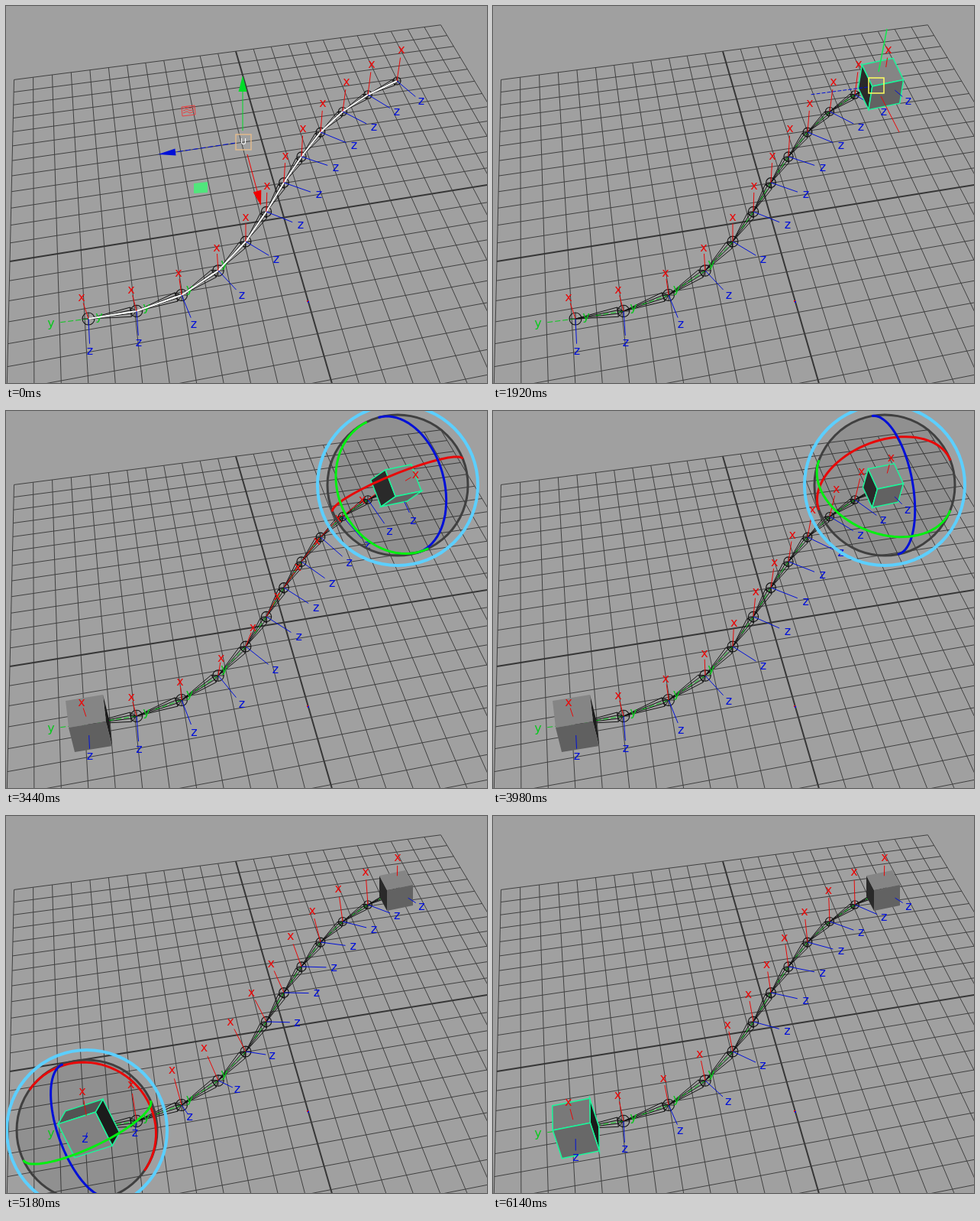
These frames come from a looping animation (630 by 493 pixels, 6.62 s). An HTML page with a canvas:

```html
<!DOCTYPE html>
<html lang="en">
<head>
<meta charset="utf-8">
<title>Twisting joint chain</title>
<style>
html, body { margin: 0; width: 100%; height: 100%; overflow: hidden; background: #a0a0a0; }
canvas { display: block; }
</style>
</head>
<body>
<canvas id="stage" width="630" height="493"></canvas>
<script>
const c = document.getElementById('stage').getContext('2d');
const LOOP = 6620, RAD = Math.PI / 180;
const RED = '#e80808', GREEN = '#08c81c', BLUE = '#0010d8', SELECT = '#1cf59a';

// Joint position, x label offset, z label offset
const joints = [
  [108, 409, -9, -27, 2, 43], [171, 399, -7, -27, 3, 42], [230, 378, -4, -28, 16, 39],
  [278, 346, -2, -29, 31, 33], [314, 308, 0, -31, 40, 24], [341, 269, 1, -33, 45, 18],
  [364, 231, 2, -34, 46, 16], [387, 197, 2, -36, 45, 15], [412, 165, 3, -37, 44, 18],
  [441, 138, 5, -38, 41, 21], [474, 116, 5, -39, 38, 23], [512, 98, 6, -40, 32, 27]
];

// Each ring: [angle, bulge] at rest and at the far turn
const cubes = {
  right: { at: [511, 97.5], side: 0, sideTone: '#2a2a2a', a: [34, -7], tilt: 0,
    d: [10, 19], e: [9, 30], h: [0, 27], f: [-26, -7], top: 133, topTurn: 0, front: 98, frontTurn: 0,
    hub: [513, 97], full: 47,
    rings: [[RED, -20, -.86, -22, -.16], [BLUE, -98, .27, -106, .66], [GREEN, 0, .61, 64, .85]] },
  left: { at: [108.5, 408.5], side: 1, sideTone: '#1b1b1b', a: [49, -8], tilt: .18,
    d: [4, 35], e: [19, 13.5], h: [8, 32], f: [-24, -30], top: 133, topTurn: 1.2, front: 96, frontTurn: -.8,
    hub: [106, 411], full: -42,
    rings: [[RED, 0, -.86, 35, -.95], [BLUE, -99, -.2, -110, -.41], [GREEN, -8, .55, -25, .25]] }
};

const mix = (a, b, p) => a + (b - a) * p;
const add = (...v) => v.reduce((s, p) => [s[0] + p[0], s[1] + p[1]]);
const mul = (v, k) => [v[0] * k, v[1] * k];
const cross = (a, b) => a[0] * b[1] - a[1] * b[0];

// Eased value through [time, value] pairs
function key(t, ...keys) {
  if (t <= keys[0][0]) return keys[0][1];
  for (let i = 1; i < keys.length; i++) {
    const [t0, v0] = keys[i - 1], [t1, v1] = keys[i];
    if (t < t1) {
      const p = (t - t0) / (t1 - t0);
      return mix(v0, v1, p * p * (3 - 2 * p));
    }
  }
  return keys[keys.length - 1][1];
}

function path(points, color, width = 1, closed = false) {
  c.beginPath();
  points.forEach(p => c.lineTo(p[0], p[1]));
  if (closed) c.closePath();
  c.strokeStyle = color;
  c.lineWidth = width;
  c.stroke();
}

function fill(points, color) {
  c.beginPath();
  points.forEach(p => c.lineTo(p[0], p[1]));
  c.fillStyle = color;
  c.fill();
}

function circle(x, y, r, color, width) {
  c.beginPath();
  c.arc(x, y, r, 0, 7);
  c.strokeStyle = color;
  c.lineWidth = width;
  c.stroke();
}

function label(text, x, y, color, size = 16) {
  c.font = size + 'px "DejaVu Sans", sans-serif';
  c.textAlign = 'center';
  c.fillStyle = color;
  c.fillText(text, x, y + size * .28);
}

function ground(u, v) {
  const w = 1 + .0485 * u - .235 * v;
  return [(359.2 * u - 7.7 * v + 364) / w, (-41.3 * u + 203.4 * v + 276.5) / w];
}

function grid() {
  for (let i = -12; i <= 12; i++) {
    const k = i / 12, width = i ? 1 : 2, color = i ? '#404040' : '#363636';
    path([ground(k, -1), ground(k, 1)], color, width);
    path([ground(-1, k), ground(1, k)], color, width);
  }
  fill([[394, 385], [396, 385], [396, 387], [394, 387]], RED);
  fill([[395, 386], [397, 386], [397, 388], [395, 388]], BLUE);
}

function pose(shift, twistL, twistR) {
  return joints.map(([x, y, xx, xy, zx, zy], i) => {
    const bump = Math.sin(Math.PI * (i / 11) ** 1.2) ** 2;
    const turn = mix(twistL, twistR, i / 11) * RAD, co = Math.cos(turn), si = Math.sin(turn);
    return {
      p: [x + .19 * shift[0] * bump, y + .06 * shift[1] * bump],
      x: [xx * co + zx * si, xy * co + zy * si],
      z: [zx * co - xx * si, zy * co - xy * si],
      r: 8 - i * .27
    };
  });
}

function bone(parent, child, r) {
  const dx = child[0] - parent[0], dy = child[1] - parent[1], len = Math.hypot(dx, dy);
  const dir = [dx / len, dy / len], norm = [-dir[1], dir[0]], wide = add(parent, mul(dir, r));
  const corners = [-.8, -.25, .3, .8].map(k => add(wide, mul(norm, k * r)));
  corners.forEach(q => path([parent, q, child], '#111'));
  path([corners[0], corners[3]], '#111');
}

function axis(j, v, color, name, from) {
  path([add(j.p, mul(v, from)), add(j.p, mul(v, .76))], color);
  label(name, ...add(j.p, v), color);
}

function axes(j, from = 0) {
  axis(j, j.x, RED, 'x', from);
  axis(j, j.z, BLUE, 'z', from);
}

function chain(chainPose, curve) {
  chainPose.forEach((j, i) => {
    const prev = i ? chainPose[i - 1].p : [45, 417];
    const y = add(mul(j.p, .22), mul(prev, .78));
    if (i) bone(j.p, prev, j.r);
    c.setLineDash([7, 3]);
    path([j.p, add(mul(j.p, .2), mul(y, .8))], GREEN);
    c.setLineDash([]);
    if (i < 5) label('y', ...y, GREEN);
    circle(...j.p, j.r, '#111', 1.1);
    path([add(j.p, [-j.r, 0]), add(j.p, [j.r, 0])], '#111', .8);
    path([add(j.p, [0, -j.r]), add(j.p, [0, j.r])], '#111', .8);
  });
  if (curve) path(chainPose.map(j => j.p), '#fff', 2);
}

function cube(q, turn, selected, at = q.at, size = 1) {
  const co = Math.cos(turn * RAD), si = Math.sin(turn * RAD);
  const A = mul([q.a[0], q.a[1] + q.tilt * turn], size);
  const D = mul(add(mul(q.d, co), mul(q.e, si)), size);
  const H = mul(add(mul(q.h, co), mul(q.f, si)), size);
  const o = add(at, mul(add(A, D, H), -.5));
  const face = (start, u, v, color) => {
    const pts = [start, add(start, u), add(start, u, v), add(start, v)];
    fill(pts, color);
    if (selected) path(pts, SELECT, 1.5, true);
  };
  const gray = v => `rgb(${v},${v},${v})`;
  face(q.side ? add(o, A) : o, D, H, q.sideTone);
  if (cross(A, D) > 0) face(o, A, D, gray(q.top + q.topTurn * turn));
  if (cross(A, H) > 0) face(add(o, D), A, H, gray(q.front + q.frontTurn * turn));
}

function mover(at, active) {
  c.save();
  c.translate(...at);
  const arm = (from, base, tip, half, color, dash) => {
    c.setLineDash(dash);
    path([from, base], color);
    c.setLineDash([]);
    const dx = tip[0] - base[0], dy = tip[1] - base[1], len = Math.hypot(dx, dy);
    const n = [-dy / len * half, dx / len * half];
    fill([tip, add(base, n), add(base, mul(n, -1))], color);
  };
  arm([-1, -15], [-1, -66], [-1, -87], 5.5, '#00dc28', []);
  arm([-10, 1], [-89, 13], [-112, 16], 4.5, BLUE, [7, 3]);
  arm([5, 16], [18, 64], [23, 83], 5.5, '#f00000', []);
  c.save();
  c.translate(-72, -41);
  path([[-9, -5], [8, -7], [9, 5], [-8, 7]], '#e84040', 1, true);
  for (let k = -4; k <= 4; k += 3) path([[-7, k + 1], [-2, k - 1], [2, k + 1], [7, k - 1]], '#e84040');
  c.restore();
  fill([[-65, 54], [-47, 52], [-47, 66], [-65, 67]], '#50e67c');
  path([[-10, -10], [10, -10], [10, 10], [-10, 10]], active ? '#ffff60' : '#dfb98c', 1.5, true);
  label('U', 0, 0, active ? '#ffff90' : '#fff', active ? 8 : 11);
  c.restore();
}

function dragger(at) {
  const to = (x, y) => add(at, [x, y]);
  path([to(3, -18), to(14, -74)], '#10e850', 1.5);
  path([to(6, 14), to(30, 61)], RED);
  c.setLineDash([5, 2]);
  path([to(-11, 2), to(-87, 12)], BLUE);
  c.setLineDash([]);
  path([to(-10, -10), to(10, -10), to(10, 10), to(-10, 10)], '#ffff60', 1.5, true);
}

function shade(q) {
  c.beginPath();
  c.arc(...q.hub, 92, 0, 7);
  c.fillStyle = 'rgba(0,0,0,.1)';
  c.fill();
}

function rings(q, turn) {
  const p = turn / q.full;
  circle(...q.hub, 92, '#404040', 3);
  circle(...q.hub, 105, '#5ccfff', 4);
  for (const [color, a0, b0, a1, b1] of q.rings) {
    const a = mix(a0, a1, p) * RAD, b = Math.max(-1, Math.min(1, mix(b0, b1, p)));
    const pts = [];
    for (let s = 0; s <= 40; s++) {
      const k = s / 40 * Math.PI, u = 92 * Math.cos(k), v = 92 * b * Math.sin(k);
      pts.push(add(q.hub, [u * Math.cos(a) - v * Math.sin(a), u * Math.sin(a) + v * Math.cos(a)]));
    }
    path(pts, color === GREEN ? '#00f010' : color, 3);
  }
}

function draw(t) {
  const { right, left } = cubes;
  const twistR = key(t, [3140, 0], [3440, 38], [3680, 60], [4220, -32], [4520, -9]);
  const twistL = key(t, [4640, 0], [5180, -42], [5320, -46], [5900, -10]);
  const shift = t < 900
    ? [key(t, [120, 0], [480, -145], [840, -14]), key(t, [120, 0], [480, -63], [840, 12])]
    : [0, 0];
  const between = (a, b) => t >= a && t < b;
  const turningR = between(3200, 4580), turningL = between(4580, 6080);
  const turnR = twistR + 9;

  c.fillStyle = '#a0a0a0';
  c.fillRect(0, 0, 630, 493);
  grid();
  if (turningR) shade(right);
  if (turningL) shade(left);

  const body = pose(shift, twistL, twistR);
  chain(body, t < 900);
  body.slice(1, -1).forEach(j => axes(j));

  const atR = [
    key(t, [1080, 366], [1380, 455], [1560, 455], [1920, 508], [2220, 511]),
    key(t, [1080, 283], [1380, 128], [1560, 128], [1920, 102], [2220, 97.5])
  ];
  const atL = [
    key(t, [2220, 511], [2480, 126], [2660, 126], [2900, 108.5]),
    key(t, [2220, 98], [2480, 402], [2660, 402], [2900, 408.5])
  ];
  if (t >= 1080) cube(right, turnR, between(1080, 2280) || turningR, atR, key(t, [1920, 1.2], [2220, 1]));
  if (t >= 2280) cube(left, twistL, between(2280, 3200) || t >= 4580, atL);
  axes(body[0], t >= 2480 ? .35 : 0);
  axes(body[11], t >= 1920 ? .45 : 0);

  if (t < 900) mover(add([311, 178], shift), t >= 180);
  if (between(1080, 1560)) mover(atR, true);
  if (between(1560, 2280)) dragger(add(atR, [-6, 2]));
  if (between(2280, 3200)) mover(atL, true);
  if (turningR) rings(right, turnR);
  if (turningL) rings(left, twistL);
}

// The viewport refreshes in 60 ms steps
function step(t) {
  const lag = t < 2400 ? 0 : 20;
  return lag + Math.floor((t - lag) / 60) * 60;
}

const start = performance.now();
function loop(now) {
  draw(step(Math.max(0, now - start) % LOOP));
  requestAnimationFrame(loop);
}
requestAnimationFrame(loop);
</script>
</body>
</html>
```
